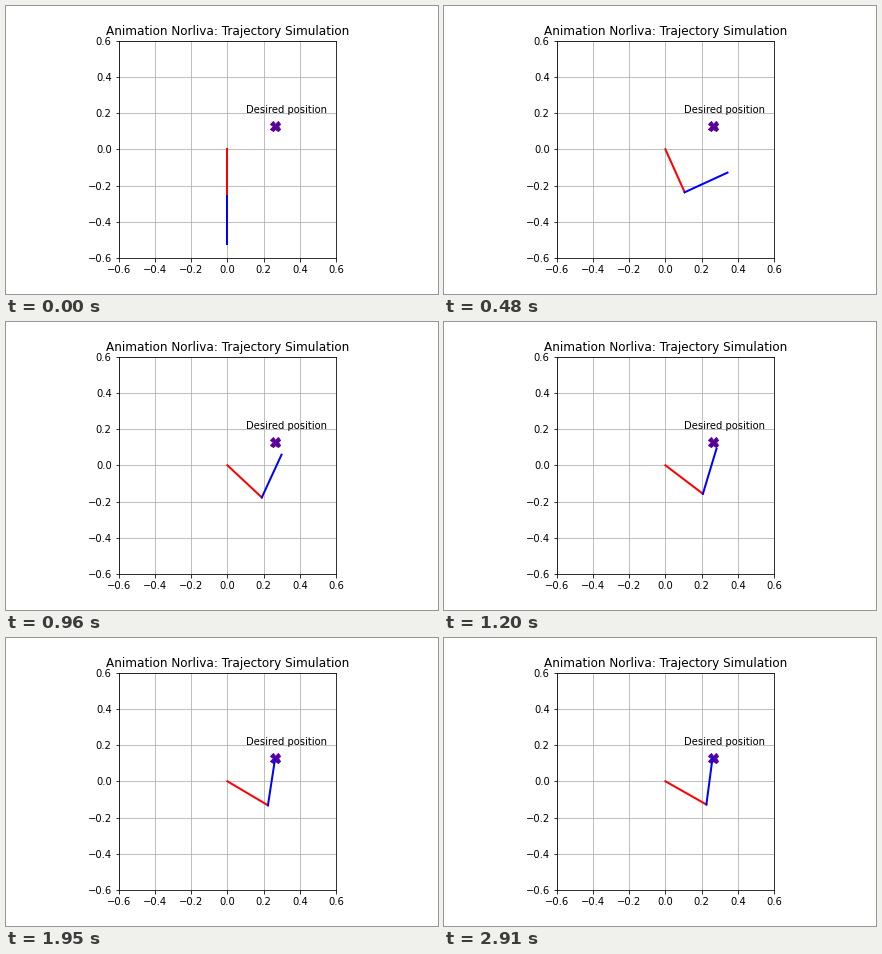
A matplotlib script that plays this animation: 432x288 px, repeating every 3 s.

```python
import numpy as np
import matplotlib.pyplot as plt
from matplotlib.animation import FuncAnimation

LINK = 0.26
TARGET = np.array([LINK, LINK / 2])
FRAMES, INTERVAL = 100, 30
LAST_MOVE = 97

# Inverse kinematics of the goal; angles are measured from straight down.
Q2_GOAL = 2 * np.arccos(np.hypot(*TARGET) / (2 * LINK))
Q1_GOAL = np.arctan2(TARGET[0], -TARGET[1]) - Q2_GOAL / 2

plt.rcParams["font.family"] = "DejaVu Sans"
fig, ax = plt.subplots(figsize=(6, 4), dpi=72)
fig.subplots_adjust(left=0.125, right=0.9, bottom=0.125, top=0.88)
ax.set_aspect("equal")
ax.set(xlim=(-0.6, 0.6), ylim=(-0.6, 0.6))
ticks = np.linspace(-0.6, 0.6, 7).round(1)
ax.set_xticks(ticks)
ax.set_yticks(ticks)
ax.grid()
ax.set_title("Animation Norliva: Trajectory Simulation")

ax.plot(*TARGET, "X", color="#5a0099", markersize=10)
ax.text(0.1, 0.2, "Desired position")
upper, = ax.plot([], [], color="red", lw=2)
lower, = ax.plot([], [], color="blue", lw=2)


def joint_angles(step):
    """Shoulder: critically damped. Elbow: first order. Both start one step late."""
    t = max(min(step, LAST_MOVE) - 1, 0)
    q1 = Q1_GOAL * (1 - (1 + 0.0915 * t) * np.exp(-0.0915 * t))
    q2 = Q2_GOAL * (1 - np.exp(-0.11 * t))
    return q1, q2


def link_end(start, angle):
    return start + LINK * np.array([np.sin(angle), -np.cos(angle)])


def update(step):
    q1, q2 = joint_angles(step)
    base = np.zeros(2)
    elbow = link_end(base, q1)
    tip = link_end(elbow, q1 + q2)
    upper.set_data(*zip(base, elbow))
    lower.set_data(*zip(elbow, tip))
    return upper, lower


anim = FuncAnimation(fig, update, frames=FRAMES, interval=INTERVAL,
                     repeat=True, repeat_delay=0, blit=False)
plt.show()
```
